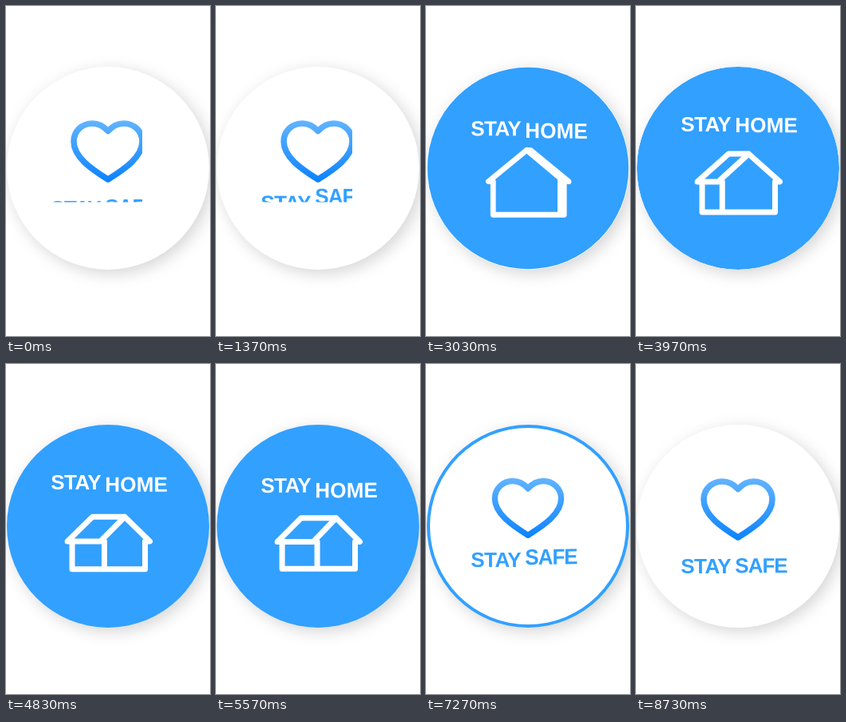
An HTML page with a canvas for the animation above (8.76 s loop, 256x413 px).

```html
<!DOCTYPE html>
<html lang="en">
<head>
<meta charset="utf-8">
<title>Stay home, stay safe</title>
<style>
  html, body { margin: 0; width: 100%; height: 100%; overflow: hidden; background: #fff; }
  .card {
    position: absolute; left: 1px; top: 76px; width: 254px; height: 254px;
    border-radius: 50%; background: #fff;
    box-shadow: 5px 5px 20px rgba(0, 0, 0, .17);
  }
  canvas { position: absolute; left: 0; top: 0; width: 256px; height: 413px; }
</style>
</head>
<body>
<div class="card"></div>
<canvas id="stage"></canvas>
<script>
const LOOP = 8760, HALF = LOOP / 2;
const BLUE = '#32a0ff', WHITE = '#fff';
const CX = 128, CY = 203, FULL = 127;
const HOME_Y = 146.5, SAFE_Y = 254;

const canvas = document.getElementById('stage');
const ctx = canvas.getContext('2d');
const dpr = window.devicePixelRatio || 1;
canvas.width = 256 * dpr;
canvas.height = 413 * dpr;

// Timing: progress from 0 to 1 after a start time
const ramp = (t, start, length) => Math.min(1, Math.max(0, (t - start) / length));
const easeOut = (t, start, length, power = 3) => 1 - (1 - ramp(t, start, length)) ** power;
const smooth = (t, start, length) => {
  const s = ramp(t, start, length);
  return s * s * (3 - 2 * s);
};

const heart = new Path2D(
  'M128 156.5C122 150 115 147 108.5 147C95 147 85 157 85 169.5C85 189 107 204 128 217' +
  'C149 204 171 189 171 169.5C171 157 161 147 147.5 147C141 147 134 150 128 156.5Z');
const heartFill = ctx.createLinearGradient(0, 143, 0, 221);
heartFill.addColorStop(0, '#62b4ff');
heartFill.addColorStop(1, '#0a82ff');

function disc(r, color) {
  ctx.beginPath();
  ctx.arc(CX, CY, r, 0, Math.PI * 2);
  ctx.fillStyle = color;
  ctx.fill();
}

function clipped(path, paint) {
  ctx.save();
  ctx.beginPath();
  path();
  ctx.clip();
  paint();
  ctx.restore();
}

// Scales about a point, then moves down by dy
function place(x, y, sx, sy, dy) {
  ctx.translate(x, y + dy);
  ctx.scale(sx, sy);
  ctx.translate(-x, -y);
}

function word(text, x, y, half, spacing, angle, sy) {
  ctx.save();
  ctx.font = 'bold 26px "Liberation Sans", Arial, sans-serif';
  ctx.letterSpacing = spacing + 'px';
  ctx.transform(1, Math.tan(angle * Math.PI / 180), 0, sy, x + half, y);
  ctx.fillText(text, -half, 9);
  ctx.restore();
}

// The words swing between two heights; tilt and stretch follow their speed
function words(t, second, color) {
  const down = t >= HALF, safe = second === 'SAFE';
  const incoming = safe === down;
  const x = .0021 * (t % HALF - 2175);
  const p = .5 + .5 * x / Math.hypot(1, x);
  const speed = (1 + x * x) ** -1.5;
  const lean = down ? -speed : speed;
  const [from, to] = down ? [HOME_Y, SAFE_Y] : [SAFE_Y, HOME_Y];
  const height = k => from + (to - from) * k;
  const p2 = incoming ? p ** 1.45 : 1 - (1 - p) ** 2.2;

  ctx.fillStyle = color;
  word('STAY', 56.3, height(p), 31, -.6, lean, 1);
  word(second, 124.3, height(p2), 34, safe ? -1 : .2,
    lean * (incoming ? 6 : 2), 1 + .33 * speed);
}

function drawHeart(t) {
  const entering = t >= HALF;
  const shown = entering ? smooth(t, 6480, 570) : 1 - smooth(t, 1450, 600);
  const size = entering ? easeOut(t, 6480, 1500) : shown;
  ctx.save();
  ctx.globalAlpha = shown;
  place(128, 182, .7 + .3 * size, .7 + .3 * size, entering ? -15 * (1 - size) : 0);
  ctx.lineWidth = 7.6;
  ctx.strokeStyle = heartFill;
  ctx.stroke(heart);
  ctx.restore();
}

// The house turns: its side wall narrows, swaps sides and widens again
function drawHouse(t) {
  const enter = easeOut(t, 2050, 1500);
  const leave = smooth(t, 5680, 570);
  const alpha = Math.min(1, enter * 1.35) * (1 - leave);
  if (!alpha) return;

  const turn = -60 + 104 * easeOut(t, 1900, 3600, 2);
  const side = Math.abs(turn);
  const left = 83, right = 174.5, mid = left + side;
  const base = 260.3 - .09 * side, eave = 216.5 + .136 * side, ridge = 174.7 + .41 * side;
  const apex = (mid + right) / 2, back = apex - side;
  const lines = new Path2D(
    `M${left - 6} ${eave}L${back} ${ridge}H${apex}L${mid - 5} ${eave}Z` +
    `M${apex} ${ridge}L${right + 6} ${eave}H${right}` +
    `M${left} ${eave}V${base}H${right}V${eave}M${mid} ${eave}V${base}`);

  const scale = .35 + .65 * enter;
  const mix = c => Math.round(c + (255 - c) * alpha);
  ctx.save();
  place((left + right) / 2, 222, turn < 0 ? -scale : scale, scale, 58 * (1 - enter) - 22 * leave);
  ctx.lineWidth = 7;
  ctx.strokeStyle = `rgb(${mix(50)},${mix(160)},255)`;
  ctx.stroke(lines);
  ctx.restore();
}

function safeScene(t) {
  drawHeart(t);
  words(t, 'SAFE', BLUE);
}

function homeScene(t) {
  disc(FULL, BLUE);
  drawHouse(t);
  words(t, 'HOME', WHITE);
}

function reveal(r, scene) {
  if (r > 0) clipped(() => ctx.arc(CX, CY, r, 0, Math.PI * 2), scene);
}

function draw(t) {
  ctx.setTransform(dpr, 0, 0, dpr, 0, 0);
  ctx.clearRect(0, 0, 256, 413);
  ctx.lineJoin = ctx.lineCap = 'round';
  if (t < HALF) {
    clipped(() => ctx.rect(0, 0, 171, 245.5), () => safeScene(t));
    reveal(FULL * easeOut(t, 2187, 1030), () => homeScene(t));
  } else {
    const r = FULL * easeOut(t, 6243, 1500);
    if (r < FULL) homeScene(t);
    reveal(r, () => {
      disc(r + 1, WHITE);
      safeScene(t);
    });
  }
}

const start = performance.now();
function tick() {
  draw((performance.now() - start) % LOOP);
  requestAnimationFrame(tick);
}
tick();
</script>
</body>
</html>
```
